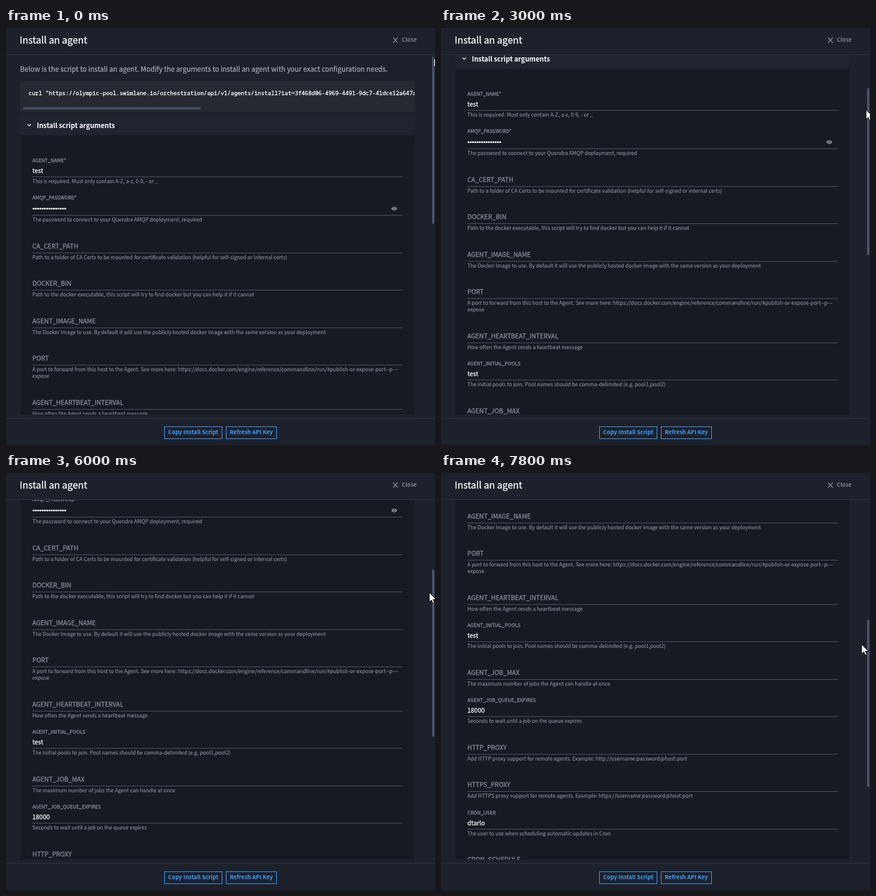
Animation, 716 px wide and 696 px high, one loop 8000 ms. Source, as an HTML page with a canvas:

```html
<!DOCTYPE html>
<html lang="en">
<head>
<meta charset="utf-8">
<title>Install an agent</title>
<style>
  html, body { margin: 0; width: 100%; height: 100%; overflow: hidden; background: #1d212b; }
  canvas { display: block; }
</style>
</head>
<body>
<canvas id="stage" width="716" height="696"></canvas>
<script>
const W = 716, H = 696, LOOP = 8000, STEP = 200;
const ctx = document.getElementById('stage').getContext('2d');
const SANS = '"Noto Sans CJK JP", "Noto Sans CJK SC", "Noto Sans CJK", "Noto Sans", sans-serif';
const MONO = '"Noto Sans Mono", "DejaVu Sans Mono", monospace';
const C = {
  page: '#1d212b', code: '#262932', section: '#1f242f', panel: '#171a23',
  rule: '#30353f', line: '#50545f', thumb: '#48536a', label: '#878c9a',
  help: '#888d9b', blue: '#409cfa', white: '#fff'
};

// [time, scroll, cursor x, cursor y]
const KEYS = [
  [0, 0, 714, 50], [1200, 0, 715, 85], [2200, 51, 712.5, 108],
  [3600, 156, 707, 158], [4800, 156, 707, 158], [5400, 187, 707, 174.5],
  [6400, 274, 706, 216], [7800, 417, 702, 286]
];

// y is the underline of the field
const FIELDS = [
  { y: 248, name: 'AGENT_NAME*', help: 'This is required. Must only contain A-Z, a-z, 0-9, - or _', value: 'test' },
  { y: 312, name: 'AMQP_PASSWORD*', help: 'The password to connect to your Quendra AMQP deployment, required', secret: true },
  { y: 375, name: 'CA_CERT_PATH', help: 'Path to a folder of CA Certs to be mounted for certificate validation (helpful for self-signed or internal certs)' },
  { y: 437, name: 'DOCKER_BIN', help: 'Path to the docker executable, this script will try to find docker but you can help it if it cannot' },
  { y: 500, name: 'AGENT_IMAGE_NAME', help: 'The Docker Image to use. By default it will use the publicly hosted docker image with the same version as your deployment' },
  { y: 562, name: 'PORT', help: 'A port to forward from this host to the Agent. See more here: https://docs.docker.com/engine/reference/commandline/run/#publish-or-expose-port--p---\nexpose' },
  { y: 636, name: 'AGENT_HEARTBEAT_INTERVAL', help: 'How often the Agent sends a heartbeat message' },
  { y: 698, name: 'AGENT_INITIAL_POOLS', help: 'The initial pools to join. Pool names should be comma-delimited (e.g. pool1,pool2)', value: 'test' },
  { y: 761, name: 'AGENT_JOB_MAX', help: 'The maximum number of jobs the Agent can handle at once' },
  { y: 823, name: 'AGENT_JOB_QUEUE_EXPIRES', help: 'Seconds to wait until a job on the queue expires', value: '18000' },
  { y: 886, name: 'HTTP_PROXY', help: 'Add HTTP proxy support for remote agents. Example: http://username:password@host:port' },
  { y: 948, name: 'HTTPS_PROXY', help: 'Add HTTPS proxy support for remote agents. Example: https://username:password@host:port' },
  { y: 1011, name: 'CRON_USER', help: 'The user to use when scheduling automatic updates in Cron', value: 'dtarlo' },
  { y: 1073, name: 'CRON_SCHEDULE', help: '' }
];

function rect(x, y, w, h, color) {
  ctx.fillStyle = color;
  ctx.fillRect(x, y, w, h);
}

function pill(x, y, w, h, color) {
  ctx.fillStyle = color;
  ctx.beginPath();
  ctx.roundRect(x, y, w, h, Math.min(w, h) / 2);
  ctx.fill();
}

function path(points, color, width = 1) {
  ctx.beginPath();
  points.forEach(([x, y], i) => i ? ctx.lineTo(x, y) : ctx.moveTo(x, y));
  ctx.strokeStyle = color;
  ctx.lineWidth = width;
  ctx.stroke();
}

// weight adds a thin outline for medium text
function text(str, x, y, size, color, { bold = false, weight = 0, family = SANS } = {}) {
  ctx.font = `${bold ? 700 : 400} ${size}px ${family}`;
  ctx.fillStyle = ctx.strokeStyle = color;
  ctx.fillText(str, x, y);
  if (weight) {
    ctx.lineWidth = weight;
    ctx.strokeText(str, x, y);
  }
}

function eye(x, y) {
  ctx.fillStyle = '#9a9eaa';
  ctx.beginPath();
  ctx.moveTo(x - 5, y);
  ctx.quadraticCurveTo(x, y - 6.5, x + 5, y);
  ctx.quadraticCurveTo(x, y + 6.5, x - 5, y);
  ctx.fill();
  ctx.beginPath();
  ctx.arc(x, y, 1.7, 0, 7);
  ctx.strokeStyle = C.panel;
  ctx.lineWidth = 1;
  ctx.stroke();
}

function secretDots(y) {
  ctx.fillStyle = C.white;
  for (let i = 0; i < 15; i++) {
    ctx.beginPath();
    ctx.arc(46 + i * 3.77, y, 1.6, 0, 7);
    ctx.fill();
  }
}

function field({ y, name, help, value, secret }) {
  if (value || secret) text(name, 44, y - (secret ? 26 : 24), 8.15, C.label, { weight: 0.3 });
  else text(name, 44, y - 7, 10.55, C.label, { weight: 0.3 });
  if (value) text(value, 44, y - 6, 10.45, C.white, { weight: 0.25 });
  if (secret) {
    secretDots(y - 10.5);
    eye(648, y - 10.5);
  }
  rect(44, y, 618, 1, C.line);
  help.split('\n').forEach((s, i) => text(s, 44, y + 11 + i * 11, 8.63, C.help, { weight: 0.15 }));
}

function content(scroll) {
  ctx.save();
  ctx.beginPath();
  ctx.rect(0, 45, W, 600);
  ctx.clip();
  ctx.translate(0, -scroll);

  text('Below is the script to install an agent. Modify the arguments to install an agent with your exact configuration needs.',
    23.5, 73, 11.53, '#b0b4be', { weight: 0.15 });

  rect(24, 88, 658, 52, C.code);
  ctx.save();
  ctx.beginPath();
  ctx.rect(24, 88, 658, 52);
  ctx.clip();
  text('curl "https://olympic-pool.swimlane.io/orchestration/api/v1/agents/install?iat=3f468d06-4969-4491-9dc7-41dce12a647a',
    37.5, 112, 9.38, C.white, { weight: 0.3, family: MONO });
  ctx.restore();
  pill(28, 132, 297, 4, '#414a5f');

  rect(24, 147, 658, 32, C.section);
  path([[36, 160.5], [38.8, 163.3], [41.6, 160.5]], C.white, 1.2);
  text('Install script arguments', 51.5, 167, 11.2, C.white, { bold: true });

  rect(24, 179, 658, 1000, C.panel);
  FIELDS.forEach(field);
  ctx.restore();
}

function button(label, x, w) {
  ctx.strokeStyle = C.blue;
  ctx.lineWidth = 1;
  ctx.strokeRect(x + 0.5, 665.5, w - 1, 20);
  ctx.textAlign = 'center';
  text(label, x + w / 2, 678, 9.4, C.blue, { bold: true });
  ctx.textAlign = 'left';
}

function chrome() {
  text('Install an agent', 22.8, 26, 15.9, C.white, { weight: 0.25 });
  path([[646, 16], [654, 24.5]], '#8b909d', 1.2);
  path([[654, 16], [646, 24.5]], '#8b909d', 1.2);
  text('Close', 660.5, 23, 9.4, '#7d8291', { bold: true });
  rect(0, 44, W, 1, C.rule);
  rect(0, 651, W, 1, C.rule);
  button('Copy Install Script', 264, 97);
  button('Refresh API Key', 367, 85);
}

function cursor(x, y) {
  const shape = [[0, 0], [0, 16], [3.7, 12.6], [6.2, 18.2], [8.8, 17], [6.3, 11.6], [11.4, 11.4]];
  ctx.beginPath();
  shape.forEach(([dx, dy]) => ctx.lineTo(x + dx, y + dy));
  ctx.closePath();
  ctx.fillStyle = C.white;
  ctx.fill();
  ctx.strokeStyle = '#000';
  ctx.lineWidth = 1;
  ctx.stroke();
}

function pose(t) {
  const i = KEYS.findIndex(k => k[0] > t);
  if (i < 0) return KEYS[KEYS.length - 1].slice(1);
  const a = KEYS[i - 1], b = KEYS[i];
  const p = (t - a[0]) / (b[0] - a[0]);
  return a.slice(1).map((v, j) => v + (b[j + 1] - v) * p);
}

function draw(now) {
  const t = Math.floor(now % LOOP / STEP) * STEP;
  const [pos, x, y] = pose(t);
  const scroll = Math.round(pos);
  rect(0, 0, W, H, C.page);
  content(scroll);
  chrome();
  pill(711, 48 + Math.round(scroll * 0.4725), 4, 279, C.thumb);
  cursor(x, y);
}

let start;
function tick(now) {
  start ??= now;
  draw(now - start);
  requestAnimationFrame(tick);
}
requestAnimationFrame(tick);
</script>
</body>
</html>
```
